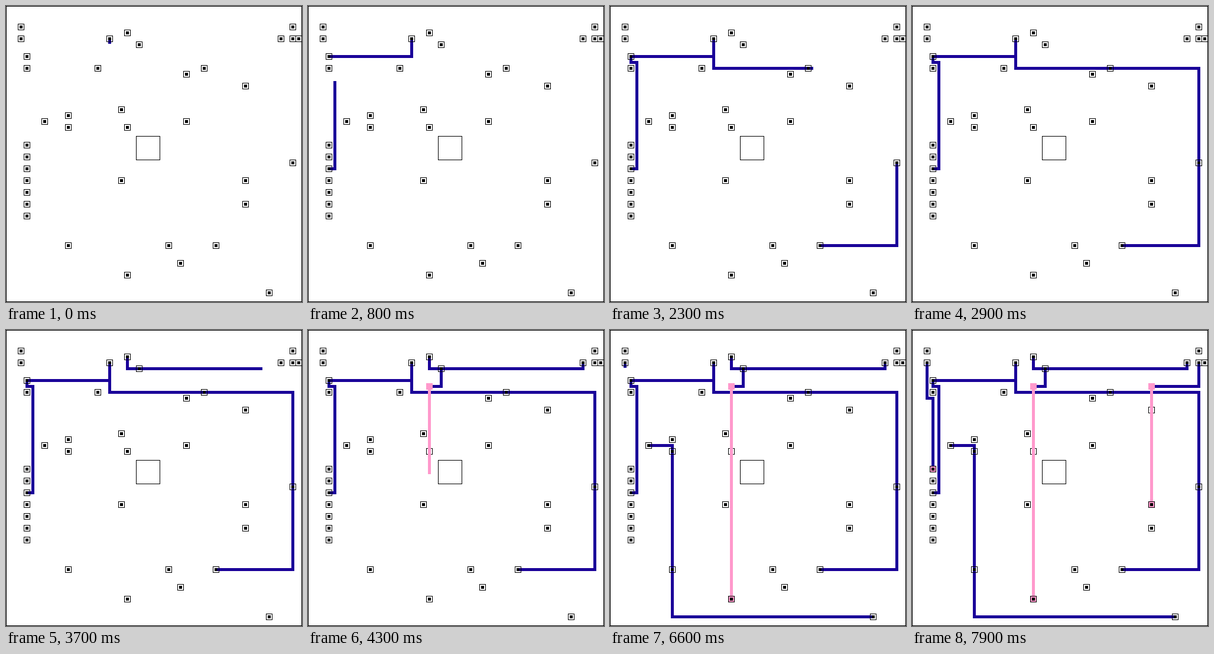
A matplotlib script that plays this animation: 501x501 px, repeating every 8000 ms.

```python
import math

import matplotlib.pyplot as plt
from matplotlib.animation import FuncAnimation
from matplotlib.collections import PolyCollection

SIZE, CELL = 501, 10
FRAMES, INTERVAL = 80, 100
FIRST, SPEED, VIA_COST = 8, 50, 10  # drawn length at start, per frame, per layer change
BLACK, BLUE, PINK = "#000000", "#1a0099", "#ff99cc"

# Key cells of each route, and the row its bottom layer runs down to (if any).
JUNCTION = (17, 8)
LINKS = [
    ("17,5 3,8", None),
    ("3,27 4,9 3,8", None),
    ("33,10 17,8", None),
    ("35,40 48,26", None),
    ("33,10 48,26", None),
    ("22,6 20,4", None),
    ("22,6 46,5", None),
    ("22,6 20,9", 45),
    ("6,19 10,20", None),
    ("10,20 10,40", None),
    ("44,48 10,40", None),
    ("2,5 2,11 3,23", None),
    ("48,5 40,9", 29),
    ("3,23", 23),
]
# Unrouted pins: column, and the rows that hold a pin.
PINS = {2: [3], 3: [10, *range(23, 36, 2)], 10: [18], 15: [10], 19: [17, 29],
        20: [20], 27: [40], 29: [43], 30: [11, 19], 40: [13, 33], 48: [3], 49: [5]}


def pixel(cell):
    return tuple(CELL * c + CELL // 2 for c in cell)


def elbows(cells):
    """Join cells by right angles: sideways first, except down then left."""
    points = cells[:1]
    for (ax, ay), (bx, by) in zip(cells, cells[1:]):
        corner = (ax, by) if bx < ax and by > ay else (bx, ay)
        points += [p for p in (corner, (bx, by)) if p != points[-1]]
    return [pixel(p) for p in dict.fromkeys(points)]


def build():
    routes, pads = [], {(x, y) for x, rows in PINS.items() for y in rows}
    for text, depth in LINKS:
        cells = [tuple(map(int, c.split(","))) for c in text.split()]
        pads.add(cells[0])
        end = cells[-1]
        bottom = []
        if depth is not None:
            bottom = [pixel(end), pixel((end[0], depth))]
            end = (end[0], depth)
        if end != JUNCTION:
            pads.add(end)
        routes.append((elbows(cells), bottom))
    return routes, sorted(map(pixel, pads))


def path_length(points):
    return sum(abs(bx - ax) + abs(by - ay)
               for (ax, ay), (bx, by) in zip(points, points[1:]))


def route_length(route):
    top, bottom = route
    return path_length(top) + (VIA_COST + path_length(bottom) if bottom else 0)


def box(x0, y0, x1, y1):
    """Polygon covering the pixels x0..x1, y0..y1 inclusive."""
    x0, x1 = sorted((x0, x1))
    y0, y1 = sorted((y0, y1))
    return [(x0, y0), (x1 + 1, y0), (x1 + 1, y1 + 1), (x0, y1 + 1)]


def square(center, r):
    x, y = center
    return box(x - r, y - r, x + r, y + r)


def outline(center, r):
    x, y = center
    left, top, right, bottom = x - r, y - r, x + r, y + r
    return [box(left, top, right, top), box(left, bottom, right, bottom),
            box(left, top, left, bottom), box(right, top, right, bottom)]


def draw_pads(centers):
    return [b for c in centers for b in outline(c, 5) + [square(c, 2)]]


def trace(points, length):
    """Boxes of a 5 px wide track drawn up to the given length."""
    boxes = []
    for (ax, ay), (bx, by) in zip(points, points[1:]):
        full = abs(bx - ax) + abs(by - ay)
        if length <= 0 or not full:
            break
        dx, dy = (bx - ax) // full, (by - ay) // full
        end = full + 2 if length >= full else length
        wx, wy = 2 * abs(dy), 2 * abs(dx)
        boxes.append(box(ax - 2 * dx - wx, ay - 2 * dy - wy,
                         ax + end * dx + wx, ay + end * dy + wy))
        length -= full
    return boxes


ROUTES, PADS = build()
STARTS = [0]
for route in ROUTES:
    STARTS.append(STARTS[-1] + 1 + math.ceil((route_length(route) - FIRST) / SPEED))


def scene(frame):
    blue, pink, pink_pads = [], [], []
    for start, route in zip(STARTS, ROUTES):
        if frame < start:
            break
        top, bottom = route
        total = route_length(route)
        length = min(FIRST + SPEED * (frame - start), total)
        blue += trace(top, length)
        below = length - path_length(top)
        if bottom and below > 0:
            pink += trace(bottom, below - VIA_COST) + [square(bottom[0], 5)]
            ends = bottom if length == total else bottom[:1]
            pink_pads += [p for p in ends if p in PADS]

    pink += [square(p, 5) for p in pink_pads]
    return [
        (BLUE, blue),
        (BLACK, draw_pads(PADS)),
        (PINK, pink),
        (BLACK, draw_pads(pink_pads)),
        (BLACK, outline((240, 240), 20) + outline((250, 250), 250)),
    ]


fig = plt.figure(figsize=(SIZE / 100, SIZE / 100), dpi=100, facecolor="white")
ax = fig.add_axes([0, 0, 1, 1])
ax.set_xlim(0, SIZE)
ax.set_ylim(SIZE, 0)
ax.axis("off")
board = PolyCollection([], linewidths=0, edgecolors="none", antialiaseds=False)
ax.add_collection(board, autolim=False)


def update(frame):
    layers = scene(frame)
    board.set_verts([b for _, boxes in layers for b in boxes])
    board.set_facecolor([color for color, boxes in layers for _ in boxes])
    return [board]


anim = FuncAnimation(fig, update, frames=FRAMES, interval=INTERVAL,
                     repeat=True, repeat_delay=0)
plt.show()
```
